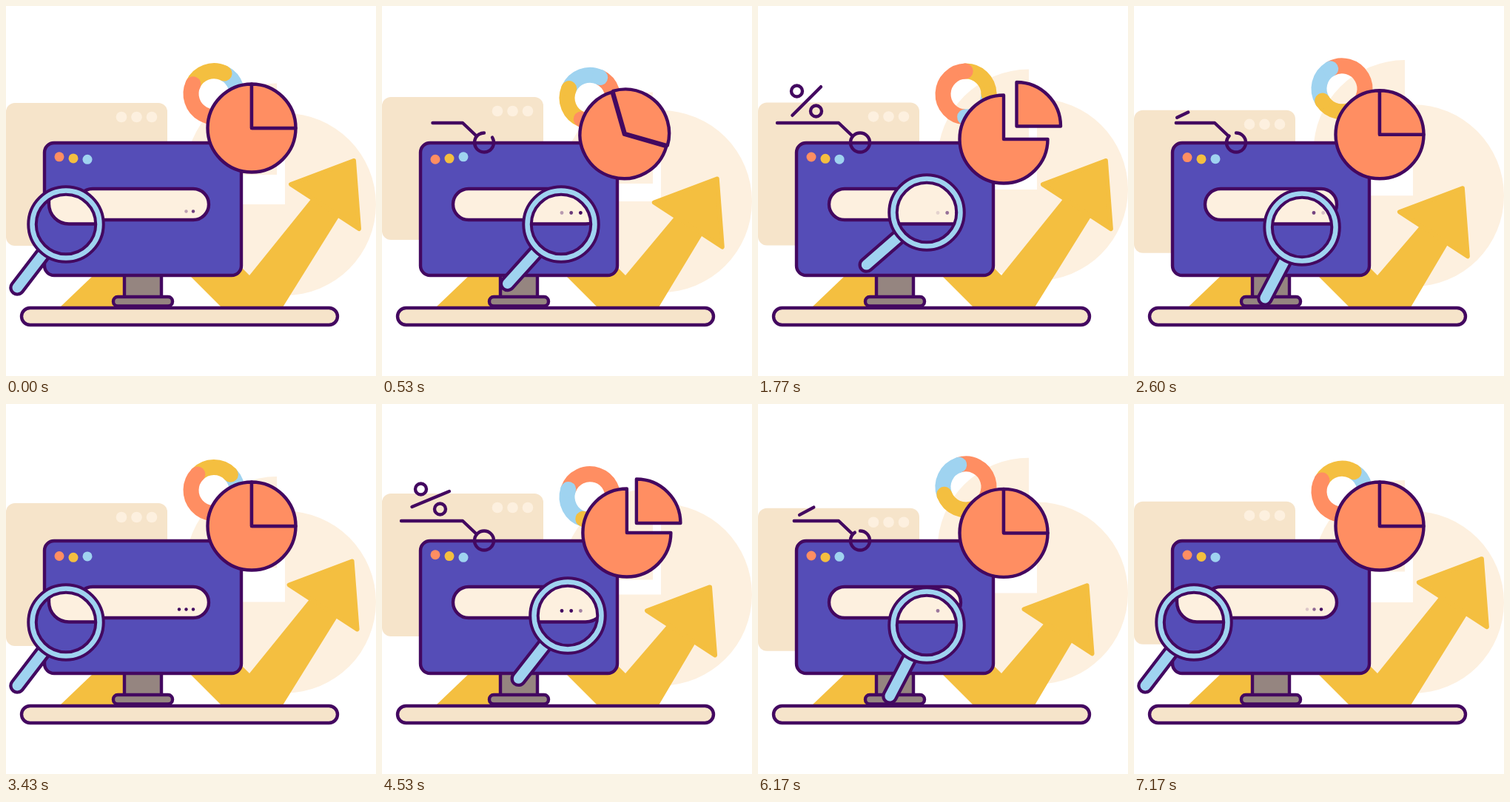
Write an HTML page with a canvas that moves like this. It is 500 px wide and 500 px high and loops after 7.21 s.

```html
<!DOCTYPE html>
<html lang="en">
<head>
<meta charset="utf-8">
<title>Search and analytics</title>
<style>
html, body { margin: 0; width: 100%; height: 100%; overflow: hidden; background: #fff; }
canvas { display: block; }
</style>
</head>
<body>
<canvas id="stage" width="500" height="500"></canvas>
<script>
const ctx = document.getElementById('stage').getContext('2d');
const LOOP = 7.21, TAU = Math.PI * 2, RAD = Math.PI / 180, STROKE = 4.4;
const INK = '#430860', PURPLE = '#554db7', PALE = '#fdf0df', SAND = '#f6e4ca',
  ORANGE = '#ff8e62', YELLOW = '#f4bf40', BLUE = '#9fd3f0', GREY = '#958580';

const clamp = v => Math.max(0, Math.min(1, v));
// Smooth 0..1 step while p goes from a to b, and a step up followed by a step down.
const ease = (p, a, b) => { const u = clamp((p - a) / (b - a)); return u * u * (3 - 2 * u); };
const pulse = (p, a, b, c, d) => ease(p, a, b) - ease(p, c, d);

function paint(fill, stroke, width = STROKE) {
  if (fill) { ctx.fillStyle = fill; ctx.fill(); }
  if (stroke) { ctx.strokeStyle = stroke; ctx.lineWidth = width; ctx.stroke(); }
}
function box(x, y, w, h, r, fill, stroke) {
  ctx.beginPath();
  ctx.roundRect(x, y, w, h, r);
  paint(fill, stroke);
}
function disc(x, y, r, fill, stroke, width) {
  ctx.beginPath();
  ctx.arc(x, y, r, 0, TAU);
  paint(fill, stroke, width);
}
function arc(x, y, r, from, to, color, width) {
  ctx.beginPath();
  ctx.arc(x, y, r, from * RAD, to * RAD);
  paint(null, color, width);
}
function slice(x, y, r, from, to, fill, stroke) {
  ctx.beginPath();
  ctx.moveTo(x, y);
  ctx.arc(x, y, r, from * RAD, to * RAD);
  ctx.closePath();
  paint(fill, stroke);
}
function poly(points, fill, stroke, width) {
  ctx.beginPath();
  points.forEach(([x, y]) => ctx.lineTo(x, y));
  ctx.closePath();
  paint(fill, stroke, width);
}
function line(points, color, width) {
  ctx.beginPath();
  points.forEach(([x, y]) => ctx.lineTo(x, y));
  paint(null, color, width);
}

function backdrop(sin, cos) {
  const y = 258 + 10 * cos, top = 131 - 10 * sin;
  slice(377, y, 123, -90, 180, PALE);
  slice(366, y - 40 + 20 * sin, 123.5, 180, 270, PALE);
  box(0, top, 218, 193, 12, SAND);
  for (let i = 0; i < 3; i++) disc(156 + 20.5 * i, top + 19, 7.3, PALE);
}

function donut(p, sin, cos) {
  const y = 118.7 + 7 * sin, a = 2 * p * RAD;
  // Two turns per cycle with an uneven pace.
  const end = 205 - 2 * p + 30 * (1 - cos) - 17 * (1 - Math.cos(a)) + 24 * Math.sin(a);
  const ring = (from, to, color, cap) => {
    ctx.lineCap = cap;
    arc(281, y, 31, from, to, color, 21);
  };
  const parts = [[end - 176, end, ORANGE], [end, end + 92, YELLOW], [end + 92, end + 184, BLUE]];
  for (const [from, to, color] of parts) ring(from, to, color, 'butt');
  for (const [, to, color] of parts) ring(to - 1, to, color, 'round');
  ctx.lineCap = 'round';
}

function arrow(p) {
  const k = (1 - Math.cos(2 * p * RAD)) / 2;
  const at = (x, y) => [x - 27 * k, y + 38.5 * k];
  poly([[73, 407], [118, 364], [165, 364], [165, 407]], YELLOW);
  poly([[291, 407], [248, 364], [300, 335], [329, 364], at(421, 250), at(455, 277), [374, 407]], YELLOW);
  poly([at(470, 209), at(385, 241), at(477, 301)], YELLOW, YELLOW, 6);
}

// Three dots fade in one after another, then out in the same order.
function dots(t, x, gap, y, r) {
  const period = LOOP / 12, u = t % period;
  const ramp = (time, middle) => clamp((time - middle) / 0.16 + 0.5);
  for (let i = 0; i < 3; i++) {
    const on = 0.16 + 0.085 * i, off = 0.51 + 0.067 * i;
    ctx.globalAlpha = Math.max(1 - ramp(u + period, off), ramp(u, on) - ramp(u, off));
    disc(x + gap * i, y, r, INK);
  }
  ctx.globalAlpha = 1;
}

function monitor(t) {
  box(160, 355, 50, 42, 0, GREY, INK);
  box(145, 393, 80, 12.5, 6, GREY, INK);
  box(21, 408, 427, 23, 11.5, SAND, INK);
  box(52, 185, 266, 179, 13, PURPLE, INK);
  [ORANGE, YELLOW, BLUE].forEach((color, i) => {
    const bob = Math.cos(TAU * (t - 0.5 - 0.21 * i) / (LOOP / 8));
    disc(72 + 19 * i, 205.5 + 1.8 * bob, 6.5, color);
  });
  box(96, 247, 178, 42, 21, PALE, INK);
  dots(t, 234, 9.5, 277.5, 2.2);
}

function callout(p) {
  // Connector, measured from the ring outwards: a diagonal, then a straight run.
  const reach = 109 * pulse(p, 18, 79, 238, 300);
  if (reach > 0) {
    const diag = Math.min(1, reach / 26);
    const bend = [128 - 19 * diag, 176 - 18 * diag];
    line([[128, 176], bend, [bend[0] - Math.max(0, reach - 26), bend[1]]], INK);
  }
  const from = ease(p, 238, 335), to = ease(p, 18, 65);
  if (to - from > 0.001) arc(138, 184.5, 13, -90 - 360 * to, -90 - 360 * from, INK);

  const size = 7.5 * pulse(p, 56, 82, 225, 250);
  if (size > 0.3) {
    disc(52.5, 115, size, null, INK);
    disc(78.5, 142, size, null, INK);
  }
  const half = 27.3 * pulse(p, 56, 85, 225, 280);
  if (half > 0.3) {
    const fall = ease(p, 225, 280);
    const a = (45 * ease(p, 60, 125) - 28 * fall) * RAD, y = 128.5 + 27 * fall;
    const dx = half * Math.cos(a), dy = half * Math.sin(a);
    line([[65.7 - dx, y + dy], [65.7 + dx, y - dy]], INK);
  }
}

function pie(p) {
  const x = 332 - 5 * pulse(p, 15, 53, 53, 110);
  const y = 165 + 9 * ease(p, 0, 60) + 6 * ease(p, 90, 170) - 15 * ease(p, 200, 335);
  const open = 13 * ease(p, 42, 92) + 4.5 * ease(p, 92, 170) - 17.5 * ease(p, 200, 250);
  const tilt = 16 * pulse(p, 10, 52, 53, 88);
  slice(x, y, 59.5, tilt, 270 - tilt, ORANGE, INK);
  slice(x + open, y - open, 59.5, -90 - tilt, tilt, ORANGE, INK);
}

// Key poses of the magnifier: phase, lens centre, handle angle.
const REST = [81, 295, 37.5];
const POSES = [[0, ...REST], [53, 242, 295, 42], [92, 251, 286, 38],
  [177, 228, 279, 49], [256, 228, 299, 27.5], [336, ...REST], [360, ...REST]];

function magnifier(p, t) {
  const i = POSES.findIndex(pose => pose[0] > p), a = POSES[i - 1], b = POSES[i];
  const k = ease(p, a[0], b[0]);
  const [, x, y, turn] = a.map((v, n) => v + (b[n] - v) * k);
  const along = r => [x - r * Math.sin(turn * RAD), y + r * Math.cos(turn * RAD)];
  line([along(52), along(108)], INK, 22);
  line([along(52), along(108)], BLUE, 13.5);

  ctx.save();
  ctx.beginPath();
  ctx.arc(x, y, 42, 0, TAU);
  ctx.clip();
  disc(x, y, 42, PURPLE);
  box(58, 225, 244, 69.5, 27, PALE, INK);
  dots(t, 243, 12.7, 279.5, 2.4);
  ctx.restore();

  disc(x, y, 45.5, null, INK, 14.5);
  disc(x, y, 45.5, null, BLUE, 6.5);
}

function draw(t) {
  const p = t / LOOP * 720 % 360;
  const sin = Math.sin(p * RAD), cos = Math.cos(p * RAD);
  ctx.clearRect(0, 0, 500, 500);
  ctx.lineCap = ctx.lineJoin = 'round';
  backdrop(sin, cos);
  donut(p, sin, cos);
  arrow(p);
  monitor(t);
  callout(p);
  pie(p);
  magnifier(p, t);
}

const start = performance.now();
function tick() {
  draw((performance.now() - start) / 1000 % LOOP);
  requestAnimationFrame(tick);
}
tick();
</script>
</body>
</html>
```
